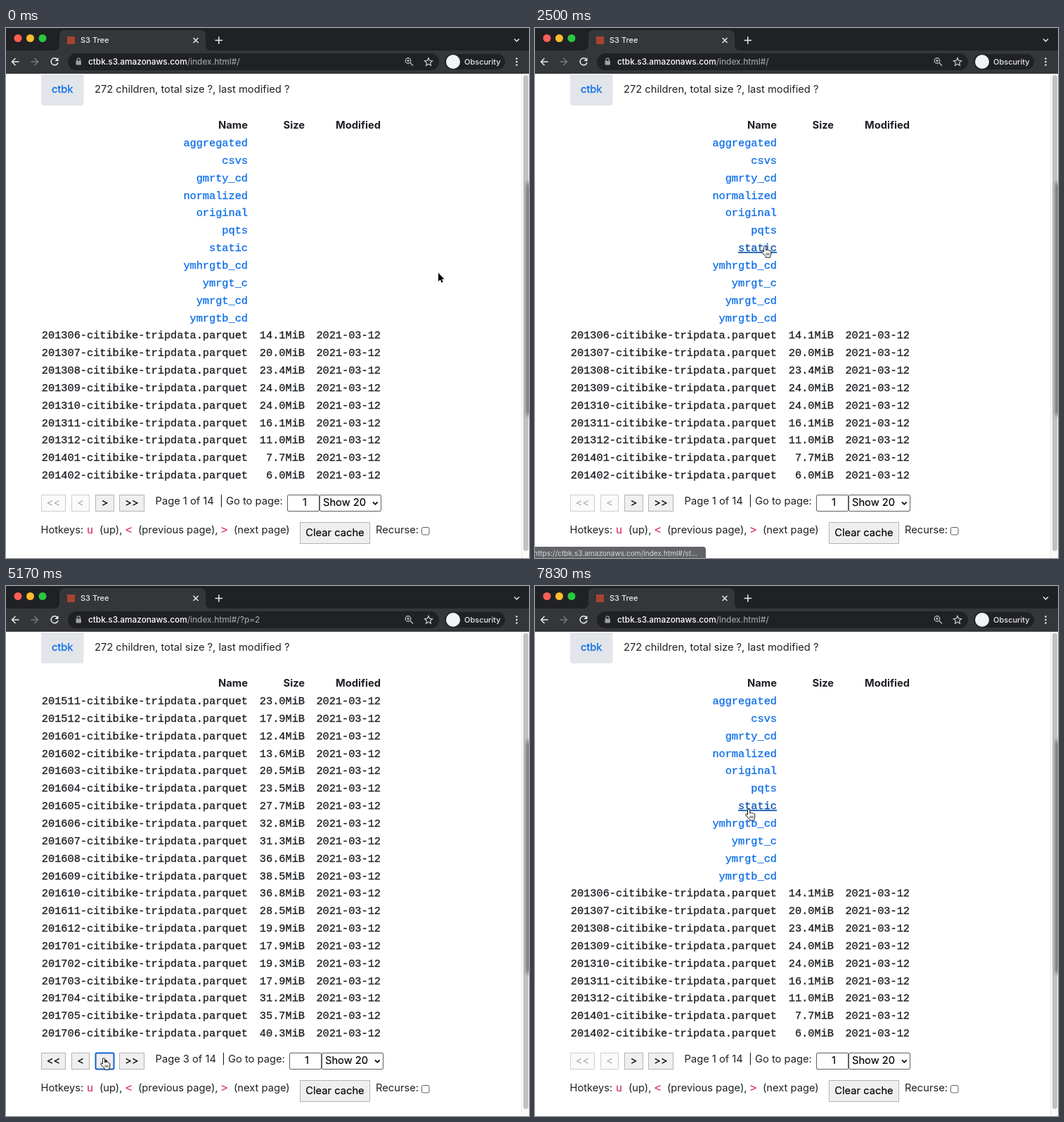
An HTML page for the animation above (8 s loop, 744 by 753 pixels).

```html
<!DOCTYPE html>
<html lang="en">
<head>
<meta charset="utf-8">
<title>S3 Tree</title>
<style>
  html, body { margin: 0; width: 100%; height: 100%; overflow: hidden; background: #fff; }
  svg { display: block; }
  text { font: 14.7px Inter, sans-serif; fill: #1d2024; white-space: pre; }
  .mono { font: 15.27px "Liberation Mono", monospace; stroke: #1d2024; stroke-width: .35; }
  .bold { font-weight: 700; }
  .end { text-anchor: end; }
  .mid { text-anchor: middle; }
  .black { fill: #000; stroke: #000; stroke-width: .15; }
  .link { fill: #0b6de8; stroke: #0b6de8; stroke-width: .3; }
  .hover { fill: #0a55b0; stroke: #0a55b0; text-decoration: underline; }
  .key { fill: #d63369; stroke: #d63369; }
  .ui { font-size: 11px; font-weight: 500; fill: #e8eaed; }
  .url { font-size: 11.8px; font-weight: 500; fill: #fff; }
  .dim { fill: #9aa0a6; }
  .icon { fill: none; stroke: #e8eaed; stroke-width: 1.5; }
  .field { fill: #fff; stroke: #5f5f5f; }
  .button { fill: #efefef; stroke: #b4b4b4; }
  .off .button { fill: #fafafa; stroke: #cfcfcf; }
  .off text { fill: #a8a8a8; stroke: none; }
  .focus .button { stroke: #1260cc; stroke-width: 2; }
</style>
</head>
<body>
<svg width="744" height="753" viewBox="0 0 744 753">
  <!-- browser frame -->
  <rect width="744" height="33" fill="#202124"/>
  <rect y="32" width="744" height="33" fill="#35363a"/>
  <path d="M68 32q8 0 8-8V11q0-8 8-8H276q8 0 8 8V24q0 8 8 8Z" fill="#35363a"/>
  <circle cx="17" cy="14.500" r="5.500" fill="#fe5f57"/>
  <circle cx="34.500" cy="14.500" r="5.500" fill="#febc2e"/>
  <circle cx="52" cy="14.500" r="5.500" fill="#28c840"/>
  <rect x="87" y="12" width="11" height="11" fill="#a5442f"/>
  <text class="ui" x="106" y="21">S3 Tree</text>
  <path class="icon" d="M266.500 14l7 7m0-7l-7 7M297.500 17.500h10.500m-5.250-5.250v10.500M723 15.500l3.500 3.500 3.500-3.500"/>
  <rect x="88" y="36" width="528" height="24" rx="12" fill="#202124"/>
  <rect x="624" y="37" width="86" height="22" rx="11" fill="#202124"/>
  <path class="icon" d="M18.500 48H8.500m5-5l-5 5 5 5"/>
  <path class="icon" d="M35.500 48h10m-5-5l5 5-5 5" style="stroke:#77797d"/>
  <path class="icon" d="M73 44.500a5 5 0 1 0 1 4.500"/>
  <path d="M74.500 42v5h-5Z" fill="#e8eaed"/>
  <rect x="99.500" y="46.500" width="7.500" height="6" rx="1" fill="#9aa0a6"/>
  <path class="icon" d="M101 47v-2a2.200 2.200 0 0 1 4.400 0v2" style="stroke:#9aa0a6;stroke-width:1.200"/>
  <g class="icon" style="stroke:#c6c8cb;stroke-width:1.200">
    <circle cx="572" cy="46.500" r="3.800"/>
    <path d="M575 49.500l4 4M570 46.500h4m-2-2v4"/>
    <path d="M601 42.500l1.600 3.700 4 .4-3 2.700.9 4-3.500-2.100-3.500 2.100.9-4-3-2.700 4-.4Z"/>
  </g>
  <circle cx="636" cy="48" r="10" fill="#f1f3f4"/>
  <text class="ui" x="652" y="52">Obscurity</text>
  <path d="M726.500 43.500v0m0 4.500v0m0 4.500v0" stroke="#e8eaed" stroke-width="2.600" stroke-linecap="round"/>

  <!-- page parts that stay put -->
  <path d="M50 66h60.500v40q0 4-4 4H54q-4 0-4-4Z" fill="#e2e5e9"/>
  <text class="link" x="65" y="92">ctbk</text>
  <text x="126" y="92">272 children, total size ?, last modified ?</text>
  <text class="bold end" x="344" y="143">Name</text>
  <text class="bold end" x="425" y="143">Size</text>
  <text class="bold end" x="533" y="143">Modified</text>
  <text x="49.500" y="718">Hotkeys:</text>
  <text class="mono key" x="115" y="718">u</text>
  <text x="133" y="718">(up),</text>
  <text class="mono key" x="170" y="718">&lt;</text>
  <text x="188" y="718">(previous page),</text>
  <text class="mono key" x="306" y="718">&gt;</text>
  <text x="324" y="718">(next page)</text>
  <rect class="button" x="418.500" y="702.500" width="99" height="30"/>
  <text class="mid black" x="468" y="722">Clear cache</text>
  <text x="526" y="718">Recurse:</text>
  <rect class="field" x="591.500" y="709.500" width="10.500" height="10.500" rx="2"/>

  <!-- scrollbar, with the shade at the window's edge -->
  <rect x="733" y="65" width="11" height="688" fill="#fafafa"/>
  <path d="M733.500 65v688" stroke="#e8e8e8"/>
  <rect x="736" y="67" width="7" height="676" rx="3.500" fill="#c1c1c1"/>
  <filter id="soft" x="-2" width="5"><feGaussianBlur stdDeviation="2 3"/></filter>
  <rect x="740" y="220" width="6" height="330" fill="#555" opacity=".75" filter="url(#soft)"/>

  <g id="live"></g>
</svg>
<script>
const live = document.getElementById('live');
const STEPS = 48, LOOP = 8000;
const ROW = 24.85, CHAR = 9.162;

const folders = ('aggregated csvs gmrty_cd normalized original pqts static ' +
  'ymhrgtb_cd ymrgt_c ymrgt_cd ymrgtb_cd').split(' ');
const sizes = [
  14.1, 20, 23.4, 24, 24, 16.1, 11, 7.7, 6,
  10.9, 16, 20.4, 21.9, 22.6, 22.5, 22.2, 19.5, 12.9, 10,
  4.8, 3.5, 5.7, 15.7, 22.5, 14.6, 25.2, 27.2, 29.4, 27.8,
  23, 17.9, 12.4, 13.6, 20.5, 23.5, 27.7, 32.8, 31.3, 36.6,
  38.5, 36.8, 28.5, 19.9, 17.9, 19.3, 17.9, 31.2, 35.7, 40.3];

// Pointer path: [step, x, y]
const path = [
  [0, 615, 348], [6, 615, 348], [7, 585, 342], [12, 345, 312], [13, 327, 310],
  [16, 327, 310], [18, 245, 500], [20, 147, 692], [21, 139, 671], [32, 139, 671],
  [34, 115, 670], [41, 115, 670], [46, 295, 335], [47, 304, 317], [48, 304, 317]];
const clicks = [23, 29, 36, 40];

// [label, left, width]
const buttons = [['&lt;&lt;', 50, 35], ['&lt;', 93, 26], ['&gt;', 127, 27], ['&gt;&gt;', 161, 36]];

const text = (x, y, s, cls = '') => `<text x="${x}" y="${y}" class="${cls}">${s}</text>`;

function pointerAt(step) {
  const i = path.findIndex(p => p[0] > step);
  const [s0, x0, y0] = path[i - 1], [s1, x1, y1] = path[i];
  const u = (step - s0) / (s1 - s0);
  return [x0 + (x1 - x0) * u, y0 + (y1 - y0) * u];
}

function pageAt(step) {
  const done = clicks.filter(c => c < step).length;
  return [0, 1, 2, 1, 0][done];
}

function fileRow(n, y) {
  const month = n + 5;
  const date = 201300 + Math.floor(month / 12) * 100 + month % 12 + 1;
  return text(344, y, date + '-citibike-tripdata.parquet', 'mono end') +
    text(425, y, sizes[n].toFixed(1) + 'MiB', 'mono end') +
    text(533, y, '2021-03-12', 'mono end');
}

function draw(step) {
  const [px, py] = pointerAt(step), page = pageAt(step);
  const focus = page === 0 && step > 40 ? -1 : step >= 36 ? 1 : step >= 23 ? 2 : -1;
  let hand = false;

  let out = text(117, 52, 'ctbk.s3.amazonaws.com<tspan class="dim">/index.html#/' +
    (page ? '?p=' + page : '') + '</tspan>', 'url');

  for (let i = 0; i < 20; i++) {
    const y = 168 + ROW * i, name = folders[i];
    if (page || !name) {
      out += fileRow(page * 20 + i - folders.length, y);
      continue;
    }
    const over = px < 344 && px > 344 - name.length * CHAR && Math.abs(py - y + 5) < 9;
    hand ||= over;
    out += text(344, y, name, 'mono end link' + (over ? ' hover' : ''));
  }

  buttons.forEach(([label, x, w], i) => {
    const off = !page && i < 2;
    hand ||= !off && px > x && px < x + w && py > 663 && py < 687;
    out += `<g class="${off ? 'off' : i === focus ? 'focus' : ''}">
      <rect class="button" x="${x + .5}" y="663.500" width="${w - 1}" height="23" rx="${i === focus ? 2 : 0}"/>
      ${text(x + w / 2, 679, label, 'mid black')}</g>`;
  });

  const dx = [0, 2, 3][page];
  out += text(212.5, 677, `Page ${page + 1} of 14`) +
    `<g transform="translate(${dx})">` + text(304, 677, '| Go to page:') +
    `<rect class="field" x="400.500" y="663.500" width="45" height="23" rx="1.500"/>
     <rect class="field" x="446.500" y="663.500" width="87" height="23" rx="1.500"/>
     <path d="M522 673.500l3.300 3.300 3.300-3.300" fill="none" stroke="#111" stroke-width="1.800"/>` +
    text(425, 679, '1', 'mid black') + text(451, 679, 'Show 20', 'black') + '</g>';

  if (step >= 14 && step < 20) {
    out += '<path d="M0 737H239q4 0 4 4V753H0Z" fill="#626366"/>' +
      `<text x="-2" y="749.500" style="font-size:10.1px;fill:#d5d6d8">https://ctbk.s3.amazonaws.com/index.html#/st...</text>`;
  }

  if (clicks.includes(step)) {
    out += `<circle cx="${px}" cy="${py}" r="26.500" fill="none" stroke="#111" stroke-width="1.400"/>`;
  }
  out += `<g transform="translate(${px} ${py})">` + (hand
    ? `<path d="M-1.500 1.500a1.600 1.600 0 0 1 3.200 0V6l1-.8q1.300-.5 1.800.6q1.500-.6 2 .5q1.800-.4 2.200 1.200V11q0 2-1 3.200V16H1.200V14.500L-4 9q-1-1.800.6-2.400L-1.500 8Z" fill="#fff" stroke="#111"/>
       <path d="M2 9.500v3.500m2-3.500v3.500m2-3.500v3.500" stroke="#111" stroke-width=".8"/>`
    : `<path d="M0 0V12l2.800-2.500 1.900 4.200 2-.9-1.900-4.100H8.500Z" stroke="#fff" stroke-width="1.600" paint-order="stroke"/>`) + '</g>';

  live.innerHTML = out;
}

let shown = -1;
function tick() {
  const step = Math.floor((performance.now() + 5) * STEPS / LOOP) % STEPS;
  if (step !== shown) draw(shown = step);
  requestAnimationFrame(tick);
}
tick();
</script>
</body>
</html>
```
